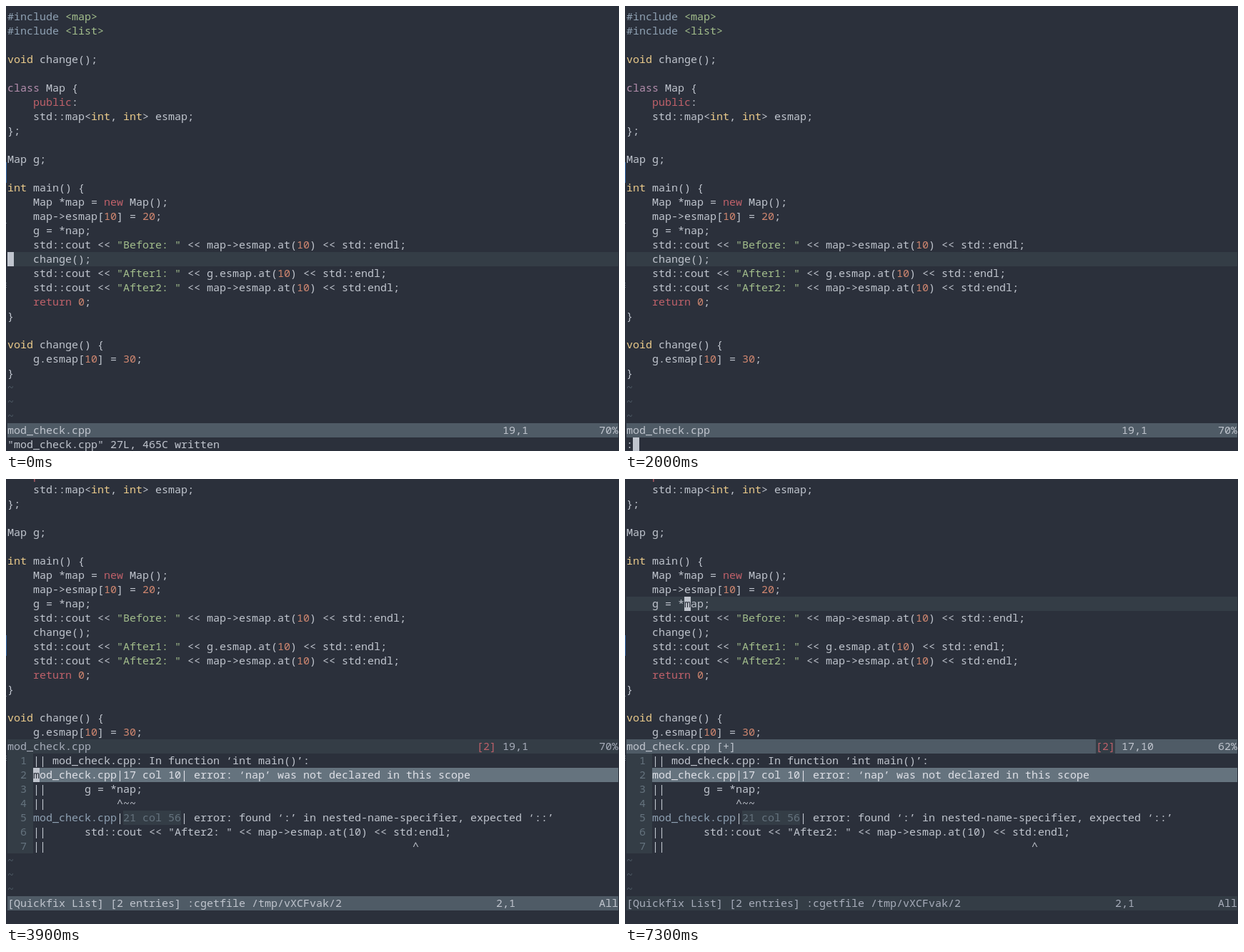
Animation, 858 px wide and 624 px high, one loop 8000 ms. Source, as an HTML page with a canvas:

```html
<!DOCTYPE html>
<html lang="en">
<head>
<meta charset="utf-8">
<title>Editor quickfix session</title>
<style>
  html, body { margin: 0; width: 858px; height: 624px; overflow: hidden; background: #2b303b; }
  canvas { display: block; }
</style>
</head>
<body>
<canvas id="stage" width="858" height="624"></canvas>
<script>
const ctx = document.getElementById('stage').getContext('2d');
const LOOP = 8000, COLS = 95, CW = 9, RH = 20, LEFT = 2, TOP = 5;
const C = {
  bg: '#2b303b', line: '#343d46', bar: '#4f5b66', dim: '#65737e', soft: '#a7adba',
  fg: '#c0c5ce', bright: '#dfe1e8', red: '#bf616a', orange: '#d08770',
  yellow: '#ebcb8b', green: '#a3be8c', blue: '#8fa1b3', purple: '#b48ead'
};

const code = `#include <map>
#include <list>

void change();

class Map {
    public:
    std::map<int, int> esmap;
};

Map g;

int main() {
    Map *map = new Map();
    map->esmap[10] = 20;
    g = *nap;
    std::cout << "Before: " << map->esmap.at(10) << std::endl;
    change();
    std::cout << "After1: " << g.esmap.at(10) << std::endl;
    std::cout << "After2: " << map->esmap.at(10) << std:endl;
    return 0;
}

void change() {
    g.esmap[10] = 30;
}`.split('\n');

const errors = [
  '|| mod_check.cpp: In function ‘int main()’:',
  'mod_check.cpp|17 col 10| error: ‘nap’ was not declared in this scope',
  '||      g = *nap;',
  '||           ^~~',
  'mod_check.cpp|21 col 56| error: found ‘:’ in nested-name-specifier, expected ‘::’',
  '||      std::cout << "After2: " << map->esmap.at(10) << std:endl;',
  '||' + ' '.repeat(57) + '^'
];

const syntax = [
  [/^#include/, C.blue],
  [/^(".*"|<(map|list)>$)/, C.green],
  [/^(void|int)$/, C.yellow],
  [/^class$/, C.purple],
  [/^(public|new|return)$/, C.red],
  [/^\d+$/, C.orange]
];

const x = col => LEFT + col * CW;
const y = row => TOP + row * RH;

function fill(row, col, cols, color) {
  ctx.fillStyle = color;
  ctx.fillRect(x(col), y(row), cols * CW, RH);
}

function put(row, col, text, color = C.fg) {
  ctx.fillStyle = color;
  [...text].forEach((ch, i) => ctx.fillText(ch, x(col + i), y(row) + 15));
}

function putCode(row, text) {
  const tokens = /#include|"[^"]*"|<(?:map|list)>$|\w+|\s+|./g;
  for (const m of text.matchAll(tokens)) {
    const rule = syntax.find(([re]) => re.test(m[0]));
    put(row, m.index, m[0], rule ? rule[1] : C.fg);
  }
}

function cursor(row, col, ch = '') {
  fill(row, col, 1, C.fg);
  put(row, col, ch, C.bg);
}

function status(row, name, active, pos, col, percent) {
  const color = active ? C.fg : C.soft;
  fill(row, 0, COLS, active ? C.bar : C.line);
  put(row, 0, name, color);
  put(row, col, pos, color);
  put(row, 92, percent, color);
}

function tildes() {
  for (let row = 26; row < 29; row++) put(row, 0, '~', C.bar);
}

function commandLine(t) {
  if (t < 2000) return '"mod_check.cpp" 27L, 465C written';
  if (t >= 3600) return 'Running: g++ mod_check.cpp';
  const typed = t < 2200 ? 0 : t < 2500 ? 1 : t < 2600 ? 2 : t < 2900 ? 3 : 9;
  return ':' + 'SCCompile'.slice(0, typed);
}

function editor(t) {
  const down = t >= 1000 && t < 1200;
  const row = down ? 18 : 17;
  const message = commandLine(t);
  fill(row, 0, COLS, C.line);
  code.forEach((text, i) => putCode(i, text));
  tildes();
  status(29, 'mod_check.cpp', true, down ? '20,1' : '19,1', 77, down ? '74%' : '70%');
  put(30, 0, message);
  if (message[0] === ':') cursor(30, message.length);
  else cursor(row, 0);
}

function quickfix(t) {
  const inCode = t >= 5800, replacing = t >= 7000 && t < 7300, fixed = t >= 7300;

  if (inCode) fill(8, 0, COLS, C.line);
  code.slice(6).forEach((text, i) => {
    if (i < 19) putCode(i - 1, fixed ? text.replace('nap', 'map') : text);
  });
  status(18, 'mod_check.cpp' + (fixed ? ' [+]' : ''), inCode,
    inCode ? '17,10' : '19,1', 77, inCode ? '62%' : '70%');
  fill(18, 73, 3, C.line);
  put(18, 73, '[2]', C.red);

  errors.forEach((text, i) => {
    const row = 19 + i;
    fill(row, 0, 4, C.line);
    put(row, 2, String(i + 1), C.dim);
    if (i === 1) fill(row, 4, COLS - 4, C.dim);
    if (i === 4) {
      fill(row, 18, 9, C.line);
      put(row, 4, text.slice(0, 13), C.blue);
      put(row, 17, '|');
      put(row, 18, text.slice(14, 23), C.dim);
      put(row, 27, text.slice(23));
    } else {
      put(row, 4, text, i === 1 ? C.bright : C.fg);
    }
  });
  tildes();
  status(29, '[Quickfix List] [2 entries] :cgetfile /tmp/vXCFvak/2', !inCode, '2,1', 76, 'All');

  if (!inCode) cursor(20, 4, 'm');
  else if (replacing) {
    ctx.fillStyle = C.fg;
    ctx.fillRect(x(9), y(9) - 4, CW, 4);
    put(30, 84, 'r');
  } else cursor(8, 9, fixed ? 'm' : 'n');
}

// Slivers of the window behind, along the left edge
function edge() {
  ctx.fillStyle = '#3465a4';
  ctx.fillRect(0, 219, 1, 29);
  ctx.fillStyle = C.dim;
  for (const top of [304, 388, 391, 394]) ctx.fillRect(0, top, 1, 1);
}

function draw(now) {
  const t = now % LOOP;
  ctx.font = '15px "Noto Sans Mono", "DejaVu Sans Mono", monospace';
  ctx.fillStyle = C.bg;
  ctx.fillRect(0, 0, 858, 624);
  (t < 3900 ? editor : quickfix)(t);
  edge();
  requestAnimationFrame(draw);
}
requestAnimationFrame(draw);
</script>
</body>
</html>
```
